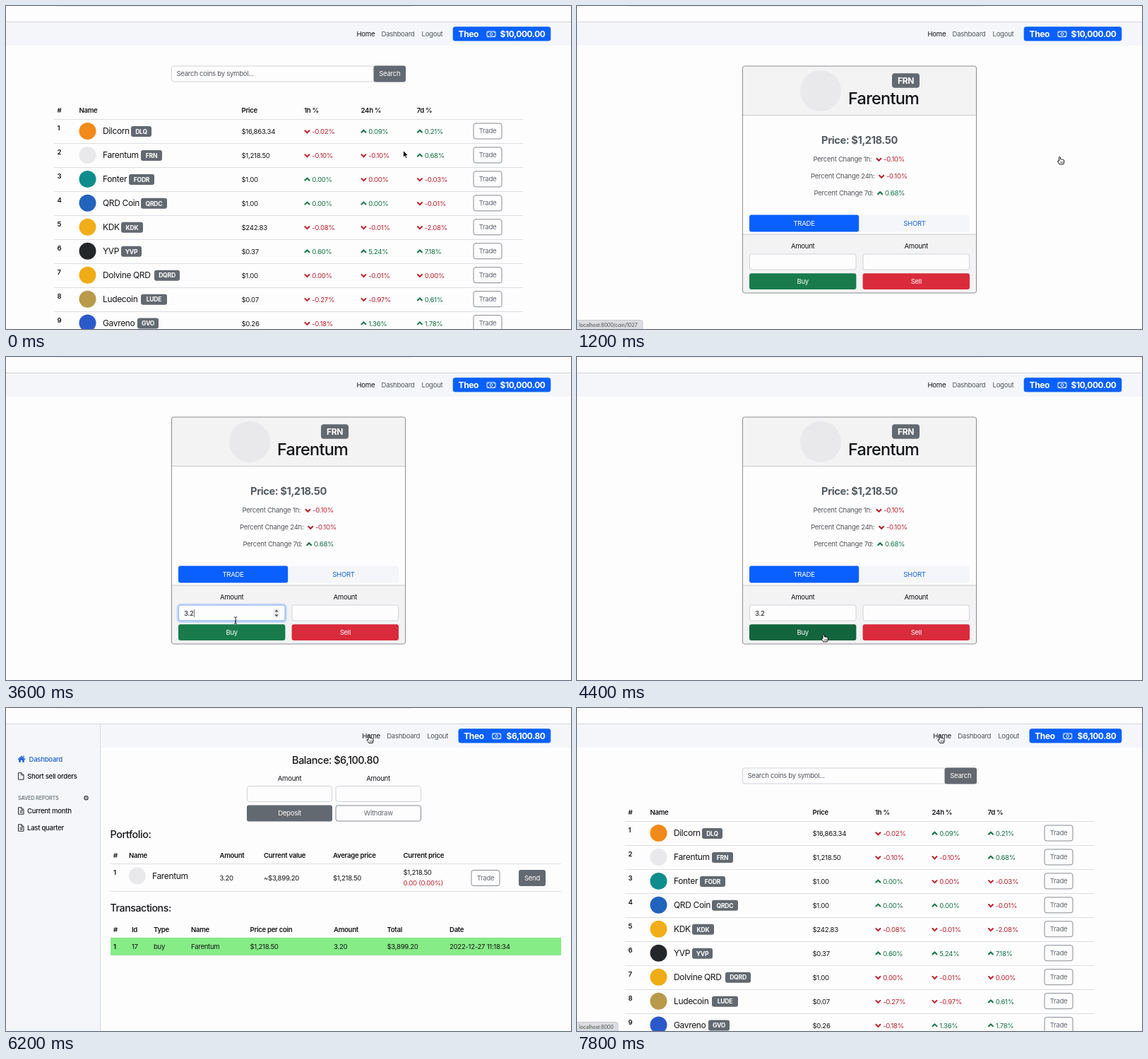
Animation of 800 by 457 pixels, one loop 8 s. Source, as an HTML page:

```html
<!DOCTYPE html>
<html lang="en">
<head>
<meta charset="utf-8">
<title>Coin trading</title>
<style>
html, body { margin: 0; width: 100%; height: 100%; overflow: hidden; background: #fefdfe; }
svg { display: block; width: 800px; height: 457px; }
text { font-family: Inter, "Open Sans", sans-serif; letter-spacing: -.03em; white-space: pre; }
</style>
</head>
<body>
<svg id="stage" viewBox="0 0 800 457"></svg>
<script>
const INK = '#121416', GRAY = '#626970', MUTED = '#53585d', BLUE = '#0a60fe',
      RED = '#ba2029', GREEN = '#117343', LINE = '#dcdee1', PANEL = '#f4f6f9', COIN = '#e9e9eb';
const COIN_NAME = 'Farentum', COIN_CODE = 'FRN';

// y is the middle of the capitals
function text(x, y, s, { size = 9.6, weight = 400, fill = INK, anchor = 'start', id = '' } = {}) {
  return `<text id="${id}" x="${x}" y="${y + size * .36}" font-size="${size}" font-weight="${weight}" fill="${fill}" text-anchor="${anchor}">${s}</text>`;
}
const bold = (x, y, s) => text(x, y, s, { weight: 600 });
const mid = (x, y, s, opt) => text(x, y, s, { anchor: 'middle', ...opt });
function box(x, y, w, h, fill, stroke = 'none', r = 0, id = '') {
  return `<rect id="${id}" x="${x}" y="${y}" width="${w}" height="${h}" rx="${r}" fill="${fill}" stroke="${stroke}"/>`;
}
const hline = (x1, x2, y, color = LINE) => `<path d="M${x1} ${y}H${x2}" stroke="${color}"/>`;
const disc = (x, y, r, fill) => `<circle cx="${x}" cy="${y}" r="${r}" fill="${fill}"/>`;
const group = (id, body) => `<g id="${id}">${body}</g>`;

function button(x, y, w, h, label, fill, ink = '#fff', id = '') {
  const outline = fill === 'none';
  return (outline ? box(x + .5, y + .5, w - 1, h - 1, 'none', '#858b91', 3, id) : box(x, y, w, h, fill, 'none', 3, id))
    + mid(x + w / 2, y + h / 2, label, { fill: ink, id: id && id + 'Label' });
}
const input = (x, y, w) => box(x + .5, y + .5, w - 1, 22, '#fefdfe', '#ced3d8', 3);

function change(x, y, value, up) {
  const color = up ? GREEN : RED, k = up ? 1 : -1;
  return `<path d="M${x + .8} ${y + 1.8 * k}l3.6 ${-3.6 * k}l3.6 ${3.6 * k}" fill="none" stroke="${color}" stroke-width="2"/>`
    + text(x + 11.2, y, value, { fill: color });
}

// name, code, colour, badge x, badge width, price, three changes (+ marks a rise)
const coins = [
  ['Dilcorn', 'DLQ', '#f28a1a', 177, 29, '$16,863.34', '-0.02 +0.09 +0.21'],
  [COIN_NAME, COIN_CODE, COIN, 191, 30, '$1,218.50', '-0.10 -0.10 +0.68'],
  ['Fonter', 'FODR', '#0f8c8c', 174, 36, '$1.00', '+0.00 0.00 -0.03'],
  ['QRD Coin', 'QRDC', '#2263bb', 191, 37, '$1.00', '+0.00 +0.00 -0.01'],
  ['KDK', 'KDK', '#f2ae18', 163, 31, '$242.83', '-0.08 -0.01 -2.08'],
  ['YVP', 'YVP', '#23272a', 163, 29, '$0.37', '+0.60 +5.24 +7.18'],
  ['Dolvine QRD', 'DQRD', '#efac15', 210, 36, '$1.00', '0.00 -0.01 0.00'],
  ['Ludecoin', 'LUDE', '#b89a4a', 191, 37, '$0.07', '-0.27 -0.97 +0.61'],
  ['Gavreno', 'GVO', '#2b59c9', 186, 30, '$0.26', '-0.18 +1.36 +1.78'],
];

function coinRow([name, code, color, bx, bw, price, changes], i) {
  const y = 177 + i * 33.95;
  const cells = changes.split(' ').map((c, k) =>
    change([422, 502, 581.5][k], y + .5, c.replace('+', '') + '%', c[0] === '+'));
  return hline(68, 732, Math.round(y - 17) + .5)
    + bold(72.5, y - 4, i + 1) + disc(115.5, y, 12, color)
    + text(137, y, name, { size: 12 })
    + box(bx, y - 7, bw, 15, GRAY, 'none', 3)
    + mid(bx + bw / 2, y + .7, code, { size: 8.6, weight: 700, fill: '#fff' })
    + text(333.5, y + .5, price) + cells.join('')
    + button(661.5, y - 11.5, 41, 23, 'Trade', 'none', GRAY, 'trade' + i);
}

const listPage = box(234.5, 85, 331, 22, '#fefdfe', '#ced3d8', 3)
  + text(241.5, 96, 'Search coins by symbol...', { fill: MUTED })
  + box(520.5, 84.5, 45.5, 23, GRAY, 'none', 3) + mid(543.3, 96, 'Search', { fill: '#fff' })
  + [[72.5, '#'], [103.5, 'Name'], [333.5, 'Price'], [422, '1h %'], [502.5, '24h %'], [581.5, '7d %']]
    .map(([x, s]) => bold(x, 148, s)).join('')
  + coins.map(coinRow).join('');

const coinPage = box(234.5, 85, 331, 321, '#fefdfe', 'none', 3)
  + box(235, 85, 330, 69.5, '#f3f3f4', 'none', 3) + box(235, 323, 330, 83, '#f3f3f4', 'none', 3)
  + hline(235, 565, 154.5, '#c9cacc') + hline(235, 565, 323, '#c9cacc')
  + box(234.5, 85, 331, 321, 'none', '#8b8d90', 3)
  + disc(345, 120, 29, COIN)
  + box(446, 95.2, 39, 20.5, GRAY, 'none', 4) + mid(465.5, 105.7, COIN_CODE, { size: 12, weight: 700, fill: '#fff' })
  + text(384, 130.5, COIN_NAME, { size: 23.4, weight: 500 })
  + mid(400, 190, 'Price: $1,218.50', { size: 14.7, weight: 700, fill: '#555c62' })
  + [['1h', 334.5, 423, '-0.10%'], ['24h', 331, 426.8, '-0.10%'], ['7d', 335.5, 424.8, '0.68%']].map(([s, x, cx, v], i) =>
    text(x, 217 + i * 24, `Percent Change ${s}:`, { fill: MUTED }) + change(cx, 217 + i * 24, v, i === 2)).join('')
  + button(244, 295.4, 155.2, 24, 'TRADE', BLUE) + button(400, 295.4, 156, 24, 'SHORT', PANEL, '#1663e0')
  + mid(319.7, 340, 'Amount') + mid(480.3, 340, 'Amount')
  + group('focus', box(243.3, 350.3, 153, 24.2, 'none', '#c2d8fc', 4).replace('/>', ' stroke-width="3"/>'))
  + input(244, 350.5, 151.6) + input(404.5, 350.5, 151.6)
  + group('spinner', box(244.5, 351, 150.6, 22, 'none', '#8ab6f8', 3)
    + box(378, 356, 10, 13, '#efeff0', 'none', 2)
    + '<path d="M380.5 360.5l2.5-3 2.5 3zM380.5 364.5l2.5 3 2.5-3z" fill="#444"/>')
  + text(252, 362.3, '', { id: 'typed' })
  + '<path id="caret" d="M0 357v11" stroke="#555" stroke-width=".8"/>'
  + button(244, 378.3, 151.4, 22.8, 'Buy', '#197b4b', '#fff', 'buy') + button(404.6, 378.3, 151.4, 22.8, 'Sell', '#d92b3b');

const sheet = (x, y, lines) => `<path d="M${x} ${y - 4.5}h4.5l3 3v6.5h-7.5z M${x + 4.3} ${y - 4.5}v3.2h3.2${lines ? ` M${x + 2} ${y + .5}h4 M${x + 2} ${y + 2.5}h4` : ''}" fill="none" stroke="#25282b"/>`;
const side = (x, y, s, fill) => text(x, y, s, { weight: 500, fill });

const dashPage = box(0, 23, 133, 434, PANEL) + '<path d="M133.5 23V457" stroke="#d8dadd"/>'
  + '<path d="M16.5 72.5l5.5-5 5.5 5-.8.9-4.7-4.2-4.7 4.2zM18.2 73l3.8-3.4 3.8 3.4v3.8h-2.6v-3h-2.4v3h-2.6zM24.3 67.6h1.4v2.6l-1.4-1.2z" fill="#1f62d2"/>'
  + side(32.5, 73, 'Dashboard', '#1f62d2')
  + sheet(17.5, 96.2) + side(30, 97, 'Short sell orders')
  + text(17, 127.3, 'SAVED REPORTS', { size: 7.4, weight: 500, fill: '#666c72' })
  + '<circle cx="113.5" cy="127.3" r="2.6" fill="none" stroke="#333" stroke-width="1.2"/><circle cx="113.5" cy="127.3" r=".8"/>'
  + sheet(17.5, 145.2, true) + side(30, 146, 'Current month')
  + sheet(17.5, 169.2, true) + side(30, 170, 'Last quarter')
  + mid(466.5, 74.3, 'Balance: $6,100.80', { size: 14.4, weight: 500 })
  + mid(401.5, 99.3, 'Amount') + mid(527, 99.3, 'Amount')
  + input(341, 110, 121) + input(466.5, 110, 121.5)
  + button(341, 137.5, 121, 23, 'Deposit', GRAY) + button(466.5, 137.5, 121.5, 23, 'Withdraw', 'none', GRAY)
  + text(147.5, 178.5, 'Portfolio:', { size: 14.4, weight: 500 })
  + [[152, '#'], [174, 'Name'], [302.5, 'Amount'], [365, 'Current value'], [463, 'Average price'], [562.5, 'Current price']]
    .map(([x, s]) => bold(x, 209, s)).join('')
  + hline(148, 786, 220.5) + hline(148, 786, 259.5)
  + bold(152, 233, '1') + disc(186, 237.5, 12, COIN) + text(207, 238, COIN_NAME, { size: 12 })
  + text(302.5, 240.5, '3.20') + text(365, 240.5, '~$3,899.20') + text(463, 240.5, '$1,218.50')
  + text(562.5, 233, '$1,218.50') + text(562.5, 247.3, '0.00 (0.00%)', { fill: RED })
  + button(658.5, 229, 41, 23, 'Trade', 'none', GRAY) + button(726, 229, 38, 23, 'Send', GRAY)
  + text(147.5, 283, 'Transactions:', { size: 14.2, weight: 500 })
  + box(148, 325, 638, 24.5, '#86ec86') + hline(148, 786, 325.3, '#9fdca2') + hline(148, 786, 349.5, '#9fdca2')
  + [[152, '#', '1'], [178, 'Id', '17'], [209, 'Type', 'buy'], [262, 'Name', COIN_NAME], [345.5, 'Price per coin', '$1,218.50'],
    [464, 'Amount', '3.20'], [539.5, 'Total', '$3,899.20'], [628, 'Date', '2022-12-27 11:18:34']]
    .map(([x, head, v], i) => bold(x, 313.3, head) + (i ? text(x, 337.7, v) : bold(x, 337.7, v))).join('');

const header = box(72, 0, 503, 1, '#ececee') + box(0, 22, 800, 34, PANEL) + hline(0, 800, 22.5, '#d3d5d8');
const nav = box(632.7, 29.2, 138.6, 20.4, BLUE, 'none', 3.5, 'wallet')
  + group('menu', text(496.5, 40, 'Home') + text(531.5, 40, 'Dashboard', { fill: MUTED }) + text(588.5, 40, 'Logout', { fill: MUTED })
    + text(640.5, 39.8, 'Theo', { size: 12, weight: 700, fill: '#fff' })
    + box(681, 36, 12, 7.6, 'none', '#fff', 1) + '<ellipse cx="687" cy="39.8" rx="1.7" ry="2.1" fill="none" stroke="#fff"/>'
    + '<path d="M682 37.2h1.4M690.6 37.2h1.4M682 42.4h1.4M690.6 42.4h1.4" stroke="#fff"/>')
  + text(763.5, 39.8, '', { size: 11.9, weight: 700, fill: '#fff', anchor: 'end', id: 'money' });

const pointers =
  group('arrow', '<path d="M0 0V9.6L2.2 7.6 3.7 11 5.4 10.3 3.9 7H6.8Z" fill="#000" stroke="#fff" stroke-width=".8"/>')
  + group('hand', '<path d="M-1 .8Q0-.6 1 .8V4Q2 3.2 2.9 4.2 4 3.6 4.6 4.7 6.2 4.2 6.2 5.8V8Q6 9.5 5.2 11H-.2Q-1.2 9-3 6.9-3.4 5.4-1 6.6Z" fill="#fff" stroke="#000" stroke-width=".9"/><path d="M1.2 7.2v2.4M2.9 7.2v2.4M4.5 7.2v2.4" stroke="#000" stroke-width=".6"/>')
  + group('beam', '<path d="M-2-4.8Q0-4.8 0-3.5 0-4.8 2-4.8M0-3.5V3.5M-2 4.8Q0 4.8 0 3.5 0 4.8 2 4.8M-1.2 1.4H1.2" fill="none" stroke="#111" stroke-width=".9"/>');

document.getElementById('stage').innerHTML = box(0, 0, 800, 457, '#fefdfe') + header
  + group('list', listPage) + group('coin', coinPage) + group('dash', dashPage) + nav
  + group('status', box(-4, 444.5, 97, 16, '#dcdde0', '#c8c9cc', 3, 'statusBox') + text(3, 451, '', { size: 7.3, fill: '#4d5156', id: 'url' }))
  + group('pointer', pointers);

const $ = id => document.getElementById(id);
const show = (id, on) => $(id).style.display = on ? '' : 'none';
const set = (id, name, value) => $(id).setAttribute(name, value);

// pointer moves: start, end, target x, target y
const moves = [[200, 800, 683.5, 213], [1400, 2200, 312, 362], [3400, 3900, 349, 392], [5200, 6200, 514, 38.5]];
function pointerAt(t) {
  let x = 562.5, y = 204.5;
  for (const [from, to, tx, ty] of moves) {
    const p = Math.min(1, Math.max(0, (t - from) / (to - from))), e = p * p * (3 - 2 * p);
    x += (tx - x) * e;
    y += (ty - y) * e;
  }
  return [x, y];
}

function draw(t) {
  const page = t < 1200 || t >= 7800 ? 'list' : t < 5200 ? 'coin' : 'dash';
  for (const p of ['list', 'coin', 'dash']) show(p, p === page);

  const paid = t >= 5200;
  $('money').textContent = paid ? '$6,100.80' : '$10,000.00';
  set('menu', 'transform', `translate(${paid ? 7.7 : 0})`);
  set('wallet', 'x', paid ? 640.5 : 632.7);
  set('wallet', 'width', paid ? 130.8 : 138.6);

  const [x, y] = pointerAt(t);
  const onTrade = t < 1200 && x > 662, onBuy = page === 'coin' && t > 3400 && y > 378;
  const inField = page === 'coin' && !onBuy && x < 395 && y > 350;
  const onHome = t > 6000 && y < 48;
  const hand = onTrade || onBuy || onHome || (t >= 1200 && t < 1600 && x > 680) || (t >= 5200 && t < 5400);
  show('hand', hand);
  show('beam', inField);
  show('arrow', !hand && !inField);
  set('pointer', 'transform', `translate(${x} ${y})`);

  set('trade1', 'fill', onTrade ? GRAY : 'none');
  set('trade1Label', 'fill', onTrade ? '#fff' : GRAY);
  set('buy', 'fill', onBuy ? '#13653d' : '#197b4b');

  const focused = t >= 2400 && t < 4200;
  const typed = '3.2'.slice(0, Math.max(0, Math.floor((t - 2600) / 200)));
  show('focus', focused);
  show('spinner', focused);
  show('caret', focused);
  $('typed').textContent = typed;
  set('caret', 'transform', `translate(${252.5 + [0, 6, 8, 14][typed.length]})`);

  const coinLink = t >= 800 && t < 1600, homeLink = t >= 6400;
  show('status', coinLink || homeLink);
  $('url').textContent = 'localhost:8000' + (coinLink ? '/coin/1027' : '');
  set('statusBox', 'width', coinLink ? 97 : 62);
}

function tick() {
  draw(Math.floor(performance.now() % 8000 / 200) * 200);
  requestAnimationFrame(tick);
}
tick();
</script>
</body>
</html>
```
